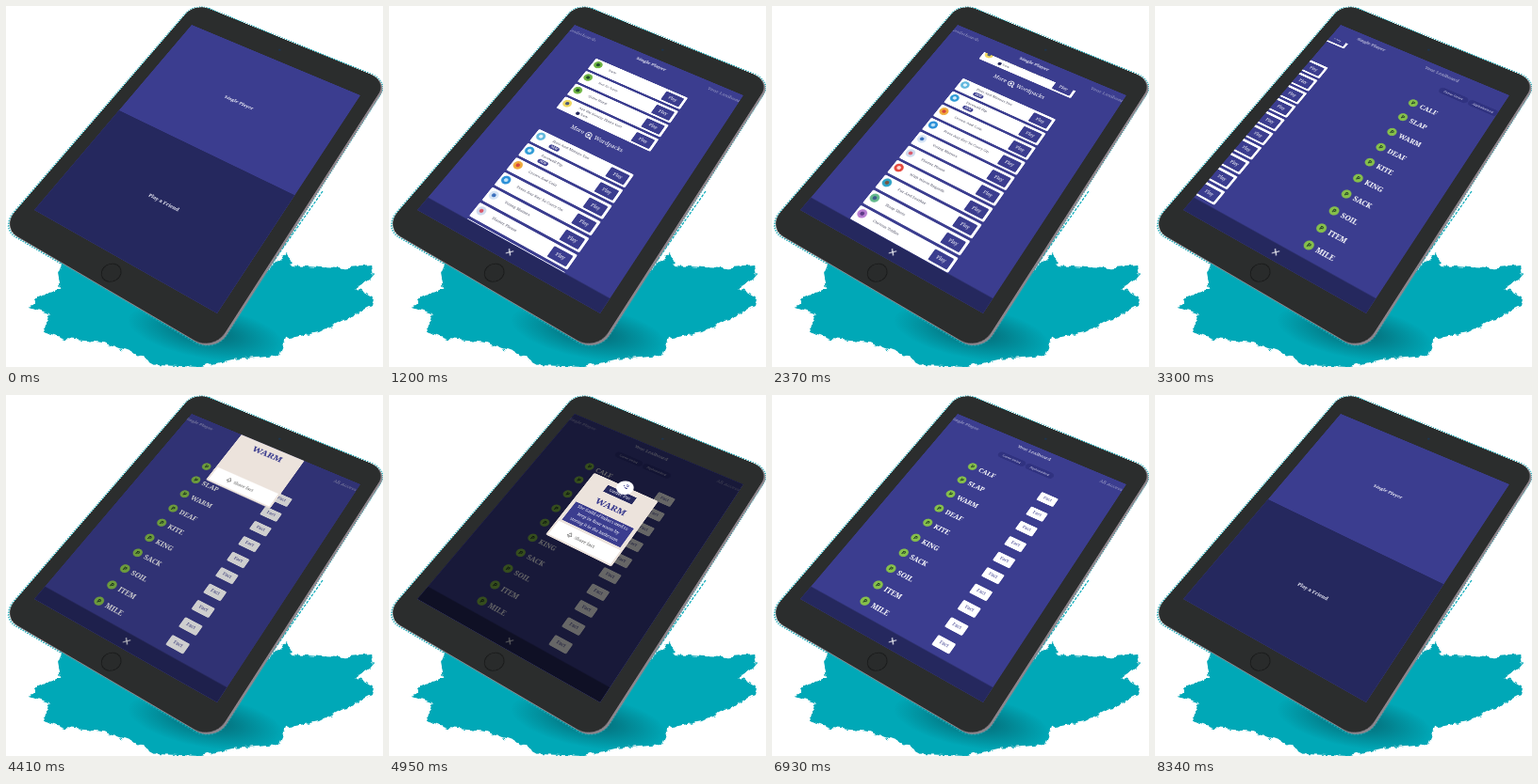
Animation, 400 px wide and 384 px high, one loop 8520 ms. Source, as an HTML page:

```html
<!DOCTYPE html>
<html lang="en">
<head>
<meta charset="utf-8">
<title>Word game on a tablet</title>
<style>
html, body { margin: 0; width: 100%; height: 100%; overflow: hidden; background: #fff; }
#stage { position: relative; width: 400px; height: 384px; overflow: hidden; font-family: "Noto Serif", serif; }
#splash { position: absolute; left: 0; top: 0; }

/* The tablet is laid out flat, then seen in perspective. */
#tablet {
  position: absolute; left: 0; top: 0; width: 300px; height: 400px; color: #fff; transform-origin: 0 0;
  transform: matrix3d(.4923, .22363, 0, -.00027757, -.4282, .41515, 0, -.0003564, 0, 0, 1, 0, 197, 20, 0, 1);
}
#tablet div, #tablet span, #tablet svg { position: absolute; }
#tablet .mid { transform: translate(-50%, -50%); white-space: nowrap; line-height: 1; }
#tablet .name { white-space: nowrap; line-height: 1; transform: translateY(-50%); }
.case { left: -22px; top: -43.6px; width: 344px; height: 487.2px; border-radius: 27px; background: #2b2d2d; }
.fringe { left: -24px; top: -45.6px; width: 346px; height: 489px; border: 2px dotted #17a7b3; border-radius: 29px; }
.rim { background: #8d858c; transform: translate(3.2px, 1px); }
.camera { left: 149px; top: -23px; width: 4px; height: 4px; border-radius: 50%; background: #1c3450; }
.button { left: 137px; top: 408.5px; width: 25px; height: 25px; border: 1.3px solid #131414; border-radius: 50%; background: #292b2b; }
#screen { inset: 0; overflow: hidden; background: #3b3d8f; }

.solo, .dark, .friend, .close, .tabs, .one, .two, .pages, .list, .shade, .card, .quote {
  animation: 8520ms linear infinite;
}
.label { font-size: 7.5px; font-weight: 600; color: #e9e9f5; }

.solo { left: 150px; top: 0; width: 0; animation-name: solo; }
.dark { left: 0; top: 0; width: 300px; height: 200px; background: #25285e; animation-name: dark; }
.friend { left: 150px; top: 100px; animation-name: friend; }
.close { left: 145.5px; top: 6.5px; animation-name: close; }
.tabs { left: 0; top: 13.4px; animation-name: tabs; }
.tab { top: 0; font-size: 7.8px; opacity: .5; }
.one { animation-name: one; }
.two { animation-name: two; }
.view { left: 0; top: 29px; width: 300px; height: 347.4px; overflow: hidden; }
.pages { left: 0; top: -29px; animation-name: pages; }
.list { left: 0; top: 0; animation-name: list; }
.shade { inset: 0; background: #000; animation-name: shade; }

.row { left: 69px; width: 162px; height: 25px; background: #fff; border-radius: 2px; color: #55566a; font-size: 6.1px; }
.row .name { left: 30px; top: 11px; }
.row.duo .name { top: 8px; }
.icon { left: 2.5px; top: 2.5px; width: 14px; height: 14px; border-radius: 50%; }
.icon::after { content: ""; position: absolute; inset: 4px; border-radius: 50%; background: var(--core); }
.play { left: 128px; top: 3.5px; width: 30px; height: 18px; background: #3b3d8f; border-radius: 1.5px; color: #fff; font-size: 7px; line-height: 17px; text-align: center; }
.new { left: 30px; top: 14px; padding: 0 3px; background: #3b3d8f; border-radius: 4px; color: #fff; font-size: 4.5px; line-height: 7px; font-weight: 700; }
.sub { left: 39px; top: 14px; font-size: 5.5px; line-height: 7px; }
.sub::before { content: ""; position: absolute; left: -8px; top: .5px; width: 6px; height: 6px; border-radius: 50%; background: #25285e; }

.pill { top: 34px; width: 48px; height: 12px; border-radius: 6px; background: #303280; color: #d4d4ea; font-size: 5.6px; line-height: 12px; text-align: center; }
.ball { left: 74px; width: 14px; height: 14px; border-radius: 50%; background: #86c04a; color: #1f3b25; font: 700 9px/14px "Noto Sans", sans-serif; text-align: center; }
.word { left: 93px; font-size: 10.6px; font-weight: 700; }
.fact { left: 198px; width: 28px; height: 17px; background: #fff; border-radius: 2px; color: #3b3d8f; font-size: 6.6px; line-height: 16px; text-align: center; }

.card { left: -56px; top: -66px; width: 112px; height: 132px; background: #ece3dc; border-radius: 3px; color: #34368c; animation-name: card; }
.card .mid { left: 56px; }
.par { left: 43px; top: -11px; width: 26px; height: 26px; border-radius: 50%; background: #fff; font-size: 10px; line-height: 20px; font-weight: 700; text-align: center; }
.ribbon { left: 31px; top: 10px; width: 50px; height: 14px; background: #25285e; color: #fff; font-size: 7.5px; line-height: 13px; text-align: center; }
.quote { left: 6px; top: 60px; width: 100px; height: 38px; background: #3b3d8f; color: #fff; font-size: 6.6px; line-height: 12px; text-align: center; animation-name: quote; }
.share { left: 3px; top: 102px; width: 106px; height: 27px; background: #fff; color: #555; font-size: 7px; }

@keyframes solo {
  0%, 4.58% { transform: translateY(100px); opacity: 1; animation-timing-function: cubic-bezier(.4, 0, .2, 1); }
  10.55% { transform: translateY(13.4px); opacity: 1; }
  10.56%, 84.86% { transform: translateY(13.4px); opacity: 0; animation-timing-function: cubic-bezier(.4, 0, .2, 1); }
  92.6%, 100% { transform: translateY(100px); opacity: 1; }
}
@keyframes dark {
  0%, 4.58%, 92.6%, 100% { transform: translateY(200px); animation-timing-function: cubic-bezier(.4, 0, .2, 1); }
  10.56%, 84.86% { transform: translateY(376.4px); animation-timing-function: cubic-bezier(.4, 0, .2, 1); }
}
@keyframes friend {
  0%, 4.58%, 92.6%, 100% { opacity: 1; }
  7.5%, 88% { opacity: 0; }
}
@keyframes close {
  0%, 7.5%, 88%, 100% { opacity: 0; }
  10.56%, 84.86% { opacity: 1; }
}
@keyframes tabs {
  0%, 8.2% { transform: none; opacity: 0; }
  10.56%, 36.27% { transform: none; opacity: 1; animation-timing-function: cubic-bezier(.3, 0, .3, 1); }
  41.9%, 84.86% { transform: translateX(-127px); opacity: 1; }
  88%, 100% { transform: translateX(-127px); opacity: 0; }
}
@keyframes one { 0%, 36.27% { opacity: 1; } 41.9%, 100% { opacity: .5; } }
@keyframes two { 0%, 36.27% { opacity: .5; } 41.9%, 100% { opacity: 1; } }
@keyframes pages {
  0%, 7.6% { transform: translateY(30px); opacity: 0; animation-timing-function: ease-out; }
  12.3%, 36.27% { transform: none; opacity: 1; animation-timing-function: cubic-bezier(.3, 0, .3, 1); }
  41.9%, 84.86% { transform: translateX(-300px); opacity: 1; }
  88%, 100% { transform: translateX(-300px); opacity: 0; }
}
@keyframes list {
  0%, 14.1% { transform: none; animation-timing-function: ease-in-out; }
  29.93%, 100% { transform: translateY(-115px); }
}
@keyframes shade {
  0%, 49.3%, 77.46%, 100% { opacity: 0; }
  57%, 69.72% { opacity: .6; }
}
@keyframes card {
  0%, 49.3% { transform: translate(150px, -80px); }
  51.76% { transform: translate(150px, 38px); animation-timing-function: ease-out; }
  56.34%, 63.38% { transform: translate(150px, 155px); animation-timing-function: cubic-bezier(.5, 0, .8, .6); }
  67.61% { transform: translate(128px, 298px) rotate(98deg); }
  70.9%, 100% { transform: translate(104px, 510px) rotate(170deg); }
}
@keyframes quote {
  0%, 53% { opacity: 0; }
  56.34%, 100% { opacity: 1; }
}
</style>
</head>
<body>
<div id="stage">
  <svg id="splash" width="400" height="384">
    <defs>
      <radialGradient id="shadow">
        <stop offset="0" stop-color="#06505a" stop-opacity=".75"/>
        <stop offset="1" stop-color="#06505a" stop-opacity="0"/>
      </radialGradient>
      <filter id="ragged" x="-5%" y="-5%" width="110%" height="110%">
        <feTurbulence type="fractalNoise" baseFrequency=".12" numOctaves="2" seed="4"/>
        <feDisplacementMap in="SourceGraphic" scale="7" xChannelSelector="R" yChannelSelector="G"/>
      </filter>
      <path id="paint" d="M60 272L55 284 58 301 36 308 25 320 46 327 40 346 62 354 104 358 138 370 160 382 206 384 240 376 290 372 297 354 332 347 388 319 390 311 371 300 390 288 388 276 352 279 302 276 298 262 272 284 200 300Z"/>
      <clipPath id="inside"><use href="#paint"/></clipPath>
    </defs>
    <use href="#paint" fill="#00a8b7" filter="url(#ragged)"/>
    <g clip-path="url(#inside)">
      <ellipse cx="212" cy="347" rx="84" ry="28" fill="url(#shadow)" transform="rotate(10 212 347)"/>
    </g>
    <path d="M336 197L264 300" stroke="#00a8b7" stroke-width="1.2" stroke-dasharray="3 1.5" fill="none"/>
  </svg>

  <div id="tablet">
    <div class="fringe"></div>
    <div class="case rim"></div>
    <div class="case"></div>
    <div class="camera"></div>
    <div class="button"></div>
    <div id="screen">
      <div class="view"><div class="pages">
        <div class="list" id="list">
          <div class="mid" style="left:152px;top:175px;font-size:9px">More
            <svg width="13" height="13" viewBox="0 0 13 13" style="position:static;vertical-align:middle" fill="none" stroke="#fff"><circle cx="6" cy="6" r="4.5" stroke-width="1.3"/><path d="M9 9l3 3" stroke-width="2"/><circle cx="6" cy="6" r="1.5" fill="#fff"/></svg>
            Wordpacks</div>
        </div>
        <div id="words" style="left:300px;top:0">
          <div class="pill" style="left:102px">Game Order</div>
          <div class="pill" style="left:151px">Alphabetical</div>
        </div>
      </div></div>
      <div class="tabs">
        <span class="tab mid" style="left:23px">Leaderboards</span>
        <span class="tab mid one label" style="left:150px">Single Player</span>
        <span class="tab mid two" style="left:277px">Your Lexihoard</span>
        <span class="tab mid" style="left:408px">All Access</span>
      </div>
      <div class="solo"><span class="mid label">Single Player</span></div>
      <div class="dark">
        <div class="friend"><span class="mid label">Play a Friend</span></div>
        <svg class="close" width="9" height="9" stroke="#fff" stroke-width="1.3"><path d="M.8.8l7.400 7.400M8.200.8L.8 8.200"/></svg>
      </div>
      <div class="shade"></div>
      <div class="card">
        <div class="ribbon">Under Par</div>
        <div class="par">-2</div>
        <span class="mid" style="top:42px;font-size:15px;font-weight:700">WARM</span>
        <div class="quote">The Guild of Bakers used to<br>keep its flour warm by<br>storing it in the bathroom</div>
        <div class="share">
          <svg width="9" height="10" style="left:24px;top:8px" fill="none" stroke="#555"><path d="M4.500 1L8 7H1ZM3 9h3"/></svg>
          <span class="name" style="left:37px;top:13px">Share fact</span>
        </div>
      </div>
    </div>
  </div>
</div>

<script>
const add = (parent, cls, text = "", css = "") => {
  const el = document.createElement("div");
  el.className = cls;
  el.textContent = text;
  el.style.cssText = css;
  parent.append(el);
  return el;
};

// name, icon colour, icon centre, optional second line
const packs = [
  ["Easy", "#6fb544", "#1f4a2a"],
  ["Not So Easy", "#6fb544", "#1f4a2a"],
  ["Quite Hard", "#6fb544", "#1f4a2a"],
  ["Are We Nearly There Yet?", "#f0d860", "#4b5a78", "sub"],
  ["Hats And Mittens Too", "#62b8de", "#e6f5fc", "new"],
  ["Farewell Pip", "#2e9bd6", "#d5ecf8", "new"],
  ["Crown And Coin", "#efaa3c", "#d8453c"],
  ["Press Any Key To Carry On", "#2b90d8", "#bfe2f7"],
  ["Voting Matters", "#d5e4f5", "#3b70bd"],
  ["Plaster, Please", "#cfdaee", "#d9596a"],
  ["With Warm Regards", "#e5483f", "#ffd9d4"],
  ["Fur And Feather", "#2ea3c6", "#7a5640"],
  ["Hoop Shots", "#64b98d", "#3a5d8c"],
  ["Curious Trifles", "#b67bd0", "#5c3a86"]
];
const list = document.getElementById("list");
packs.forEach(([name, color, core, extra], i) => {
  const y = 44 + 29 * i + (i > 3 ? 41 : 0);
  const row = add(list, extra ? "row duo" : "row", "", `top:${y}px`);
  add(row, "icon", "", `background:${color};--core:${core}`);
  add(row, "name", name);
  if (extra) add(row, extra, extra === "new" ? "NEW" : "Easy");
  add(row, "play", "Play");
});

const words = document.getElementById("words");
"CALF SLAP WARM DEAF KITE KING SACK SOIL ITEM MILE".split(" ").forEach((word, i) => {
  const y = 81.7 + 30.6 * i;
  add(words, "ball", "P", `top:${y - 7}px`);
  add(words, "word name", word, `top:${y}px`);
  add(words, "fact", "Fact", `top:${y - 8.5}px`);
});
</script>
</body>
</html>
```
